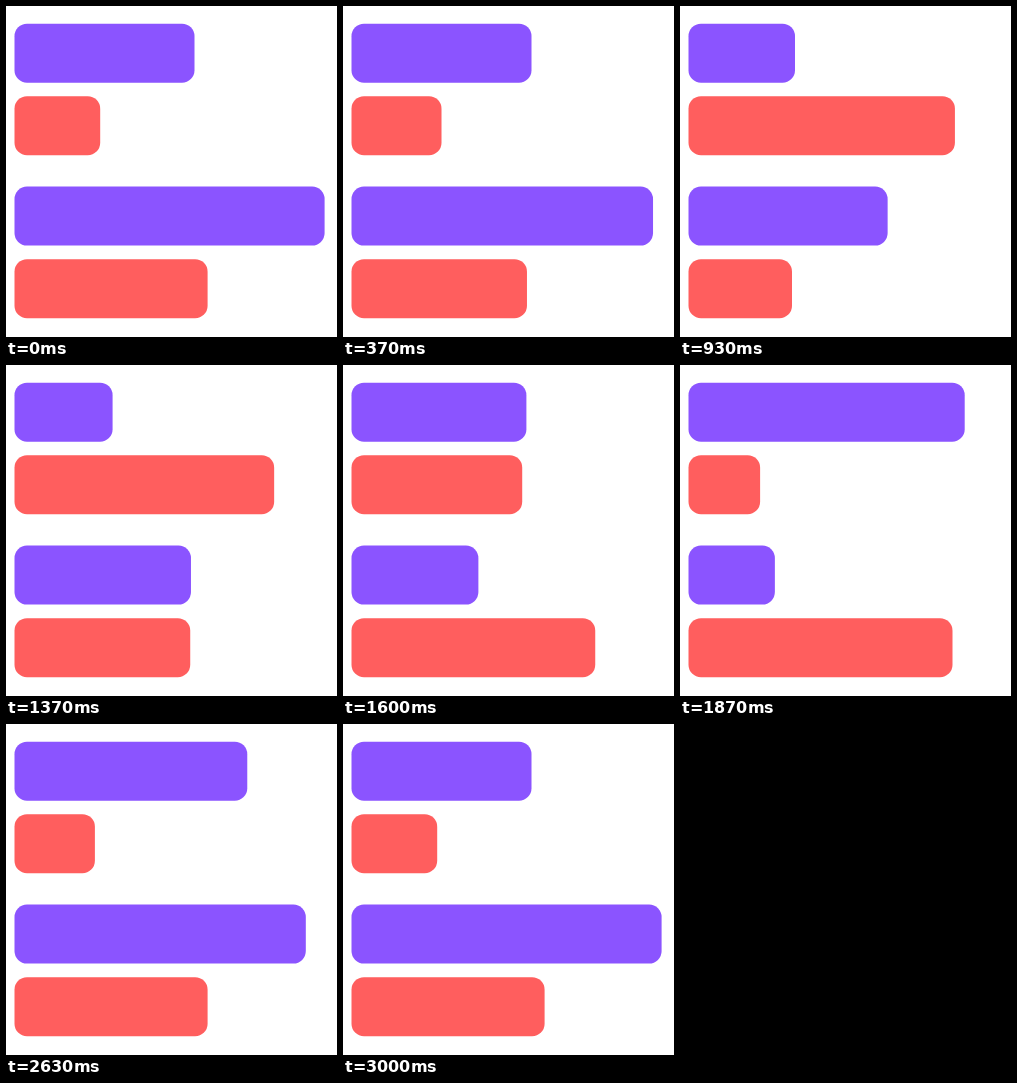
Animation of 331 by 331 pixels, one loop 3030 ms. Source, as an HTML page:

```html
<!DOCTYPE html>
<html lang="en">
<head>
<meta charset="utf-8">
<title>Bar chart loop</title>
<style>
html, body { margin: 0; width: 100%; height: 100%; overflow: hidden; background: #fff; }
svg { display: block; width: 100%; height: 100%; }
</style>
</head>
<body>
<svg viewBox="0 0 331 331"></svg>
<script>
const LOOP = 3030, FRAME = 100 / 3, MOVE = 22.5, LEFT = 8.5;
const PURPLE = '#8b54ff', RED = '#ff5e5e';

// ends: right edge in each of the three states; starts: frame at which each move begins
const bars = [
  { y: 17.7, fill: PURPLE, ends: [188.5, 97, 307.5], starts: [11.9, 38.1, 66.9] },
  { y: 90.2, fill: RED, ends: [94.2, 287.5, 66.5], starts: [9, 36.9, 62.8] },
  { y: 180.6, fill: PURPLE, ends: [318.6, 205.8, 93.8], starts: [7.2, 34.8, 60.5] },
  { y: 253.2, fill: RED, ends: [201.6, 112, 272.5], starts: [4.6, 30.5, 56.1] },
];

const svg = document.querySelector('svg');
for (const bar of bars) {
  bar.rect = document.createElementNS(svg.namespaceURI, 'rect');
  const attrs = { x: LEFT, y: bar.y, height: 59, rx: 12.5, fill: bar.fill };
  for (const name in attrs) bar.rect.setAttribute(name, attrs[name]);
  svg.append(bar.rect);
}

function ease(x) {
  x = Math.min(1, Math.max(0, x));
  return x * x * (3 - 2 * x);
}

function rightEdge({ ends, starts }, frame) {
  return starts.reduce((edge, start, i) =>
    edge + (ends[(i + 1) % 3] - ends[i]) * ease((frame - start) / MOVE), ends[0]);
}

function draw() {
  // Steps at 30 frames per second, with delays rounded to 10 ms
  const frame = Math.floor((performance.now() % LOOP + 4) / FRAME);
  for (const bar of bars) bar.rect.setAttribute('width', rightEdge(bar, frame) - LEFT);
  requestAnimationFrame(draw);
}
draw();
</script>
</body>
</html>
```
